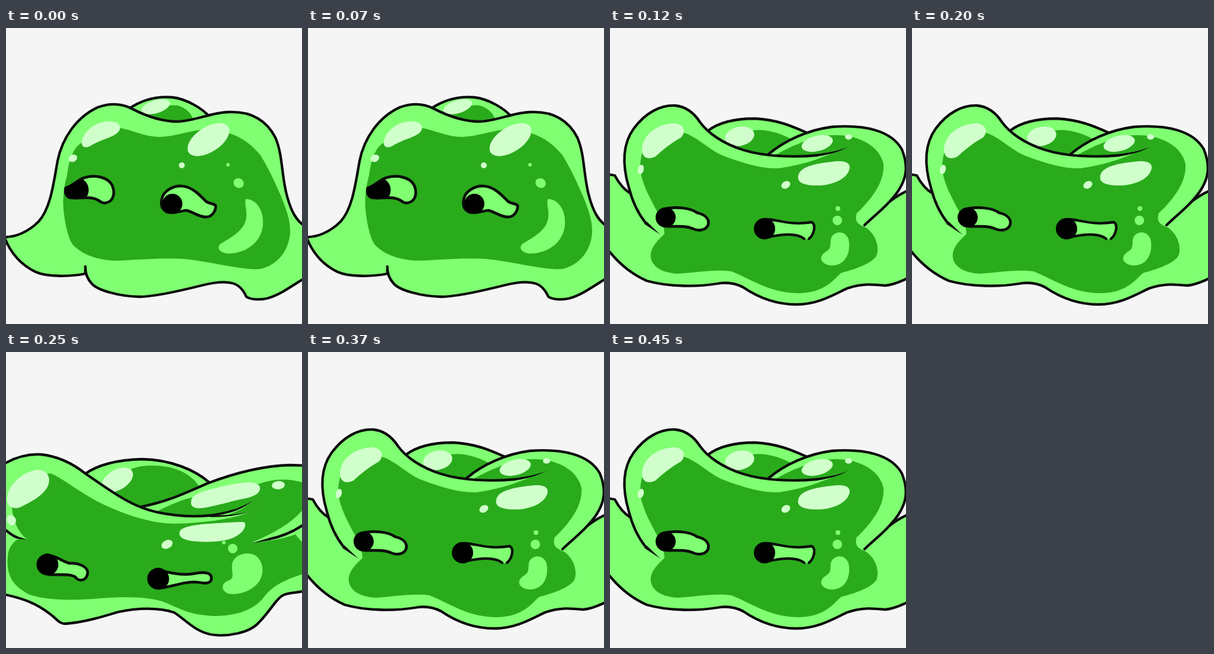
An HTML page for the animation above (500 ms loop, 500 by 500 pixels).

```html
<!DOCTYPE html>
<html lang="en">
<head>
<meta charset="utf-8">
<title>Wobbling slime</title>
<style>
  html, body { margin: 0; width: 100%; height: 100%; overflow: hidden; background: #f5f5f5; }
  svg { display: block; width: 100%; height: 100%; }
  .pose { visibility: hidden; }
  .body, .line, .eye { stroke: #0b0d0b; stroke-width: 4.3; stroke-linecap: round; stroke-linejoin: round; }
  .eye { stroke-width: 4.7; }
  .body, .eye, .light { fill: #80ff72; }
  .line { fill: none; }
  .dark { fill: #2aab1c; }
  .shine { fill: #d0ffcb; }
  .ink { fill: #0b0d0b; }
  .pupil { fill: #000; }
</style>
</head>
<body>
<svg viewBox="0 0 500 500">
  <g class="pose" id="tall">
    <path class="body" d="M208 136C232 120 256 115 280 117C308 120 333 138 343 149L300 175H230Z"/>
    <path class="dark" d="M226 145L250 141C262 132 278 129 290 131C305 135 315 146 316 156L280 160Z"/>
    <ellipse class="shine" cx="253" cy="133" rx="25" ry="11" transform="rotate(-17 253 133)"/>
    <path class="body" d="M-5 353C15 354 37 345 55 327C75 305 80 265 87 225C95 185 120 150 155 134C180 125 200 130 212 136C235 148 262 158 290 158C320 157 345 143 375 142C415 140 440 156 455 185C468 215 465 250 475 285C482 310 490 325 505 335V422C480 438 460 452 440 457C425 460 412 458 406 454C402 445 395 434 382 431C370 428 350 430 330 435C290 445 250 454 225 454C190 453 155 443 145 432C137 423 134 415 134 403L134 415C110 420 70 421 50 412C25 400 8 380 -2 355Z"/>
    <path class="dark" d="M103 250C106 225 112 208 122 198L160 172L193 169C215 173 235 184 260 184C285 183 305 175 330 172L378 178C400 185 418 200 430 215C445 240 455 262 465 285C475 310 480 325 480 345C478 375 460 400 430 407C400 410 350 395 300 390C250 388 220 392 185 393C150 392 125 380 112 365C100 345 95 300 97 285C98 270 100 260 103 250Z"/>
    <path class="shine" d="M128 194C128 180 145 160 170 158C188 156 195 164 192 172C187 184 162 187 143 199C134 204 128 201 128 194Z"/>
    <ellipse class="shine" cx="113" cy="220" rx="7.5" ry="6" transform="rotate(-25 113 220)"/>
    <ellipse class="shine" cx="342" cy="188.500" rx="40" ry="21" transform="rotate(-33 342 188.500)"/>
    <circle class="shine" cx="297" cy="232" r="5"/>
    <circle class="light" cx="375" cy="231" r="3"/>
    <ellipse class="light" cx="393" cy="262" rx="9" ry="8" transform="rotate(30 393 262)"/>
    <path class="light" d="M405 289C422 288 436 308 434 332C432 362 405 381 375 381C360 380 355 370 363 364C375 357 398 345 404 328C410 312 402 300 405 289Z"/>
    <path class="eye" d="M101 270C112 268 118 258 132 253C150 247 172 252 179 265C185 278 182 292 170 295C160 298 158 289 148 288C135 284 118 290 106 286C100 282 99 275 101 270Z"/>
    <path class="pupil" d="M100 270C112 264 120 260 130 256C140 262 142 275 137 284C125 289 105 289 102 282Z"/>
    <path class="eye" d="M263 290C265 275 283 266 297 267C315 268 328 283 338 293C345 298 352 296 354 300C355 306 350 318 340 319C330 321 318 312 305 308C295 309 285 314 272 311C264 307 261 300 263 290Z"/>
    <circle class="pupil" cx="281" cy="297" r="17"/>
  </g>

  <g class="pose" id="sagging">
    <path class="body" d="M165 174C185 158 215 153 245 153C285 155 310 167 335 178L270 230H200Z"/>
    <path class="dark" d="M242 173C262 170 288 177 310 190L268 216C240 212 215 205 196 196Z"/>
    <ellipse class="shine" cx="219" cy="183" rx="25" ry="16" transform="rotate(-12 219 183)"/>
    <path class="body" d="M-10 246L8 249C15 262 24 273 34 279L100 200L400 250L470 295C480 287 493 278 510 272V420C495 425 485 433 465 435C445 433 425 431 400 440C375 452 350 467 315 467C280 467 250 455 225 438C210 430 195 429 180 432C150 437 100 438 62 427C32 414 10 394 -10 366Z"/>
    <path class="light" d="M268 213C295 190 335 172 375 167C430 163 475 173 493 205C505 235 500 255 487 275C470 300 445 318 430 333Z"/>
    <path class="dark" d="M280 214C300 203 330 188 365 182C410 176 455 195 462 230C464 262 440 290 418 312L300 300Z"/>
    <path class="line" d="M268 213C295 190 335 172 375 167C430 163 475 173 493 205C505 235 500 255 487 275C470 300 445 318 430 333"/>
    <path class="light" d="M85 349C60 330 40 300 32 270C20 230 22 195 40 170C60 143 85 130 110 131C130 133 143 145 152 159C165 177 190 195 225 206C260 217 310 219 350 215C375 212 390 206 403 200C370 215 330 230 285 240Z"/>
    <path class="dark" d="M285 237C330 230 370 218 403 201L440 250L417 312C412 328 420 332 432 337C452 350 455 375 450 385C440 400 410 408 390 414C380 422 365 447 320 448C270 448 240 425 205 411C175 407 140 414 115 415C85 414 66 400 69 380C72 365 85 355 92 348C92 318 58 285 51 240C50 215 60 180 90 168L125 177C148 184 170 208 192 216C228 230 260 238 285 237Z"/>
    <path class="line" d="M60 329C45 310 37 290 32 270C20 230 22 195 40 170C60 143 85 130 110 131C130 133 143 145 152 159C165 177 190 195 225 206C260 217 310 219 350 215"/>
    <path class="ink" d="M62 327L85 349L58 331ZM349 213C375 210 390 206 403 200C390 208 375 213 350 217Z"/>
    <path class="shine" d="M54 205C55 180 80 162 108 161C126 162 129 176 120 185C105 193 90 205 77 217C65 223 54 220 54 205Z"/>
    <ellipse class="shine" cx="52" cy="239" rx="5" ry="8" transform="rotate(15 52 239)"/>
    <ellipse class="shine" cx="350" cy="195" rx="27" ry="13" transform="rotate(-14 350 195)"/>
    <ellipse class="shine" cx="403" cy="184" rx="6" ry="4.500"/>
    <path class="shine" d="M318 250C320 235 345 229 375 226C400 222 408 230 404 240C398 258 370 267 345 266C325 265 316 260 318 250Z"/>
    <ellipse class="shine" cx="297" cy="265" rx="8" ry="6" transform="rotate(-30 297 265)"/>
    <circle class="light" cx="385" cy="305" r="4"/>
    <circle class="light" cx="384" cy="325" r="8"/>
    <path class="light" d="M375 352C382 342 398 343 403 357C406 372 403 386 393 395C380 405 362 402 357 392C355 380 368 378 371 372C374 365 371 358 375 352Z"/>
    <path class="eye" d="M94 305C110 302 135 303 147 312C160 315 168 322 166 332C162 343 148 343 140 339C125 333 110 336 95 335"/>
    <circle class="pupil" cx="94" cy="320" r="17"/>
    <path class="light" d="M262 323C285 323 300 334 341 328L346 343L334 357L328 356C315 346 290 348 265 354Z"/>
    <path class="line" d="M262 323C285 323 300 334 341 328C349 333 344 350 336 356M328 356C315 346 290 348 265 354"/>
    <circle class="pupil" cx="261" cy="339" r="18"/>
  </g>

  <g class="pose" id="flat">
    <path class="body" d="M132 207C155 190 190 182 230 181C280 182 320 200 343 220L230 290Z"/>
    <path class="dark" d="M178 236L213 197C235 189 270 190 295 201C312 209 322 219 326 228L225 264Z"/>
    <ellipse class="shine" cx="188" cy="216" rx="29" ry="17" transform="rotate(-30 188 216)"/>
    <path class="body" d="M225 262C265 255 300 240 340 222C390 203 440 192 480 191L510 192V402C495 407 480 406 470 410C458 414 446 438 427 457C412 474 375 482 345 477C318 471 303 452 284 440C255 431 225 432 190 439C160 448 130 457 100 459C90 459 87 452 75 443C52 425 30 416 -10 408V290Z"/>
    <path class="dark" d="M255 269C285 255 300 248 320 245L430 222C460 212 485 215 505 222V262C485 288 455 305 415 322L300 330Z"/>
    <path class="light" d="M-5 190C15 178 35 172 58 173C90 176 115 190 135 206C170 230 200 252 230 263C260 275 310 280 345 276C380 271 400 262 418 250L410 285L285 295L20 330L-5 320Z"/>
    <path class="dark" d="M75 205C93 211 130 242 170 260C210 278 250 290 285 290C330 289 380 283 410 271L368 277C388 271 405 263 418 250L440 280L415 322C445 320 470 315 489 308C493 313 497 319 505 324V374C470 385 450 395 435 415C415 440 380 446 350 446C315 444 300 437 280 428C255 414 215 412 160 416C120 420 70 420 40 410C10 395 0 375 3 345C4 330 12 320 24 314L36 317C22 306 12 288 10 262L40 210Z"/>
    <path class="line" d="M-5 190C15 178 35 172 58 173C90 176 115 190 135 206C170 230 200 252 230 263C260 275 310 280 345 276M505 290C485 304 465 312 445 316M-5 297C4 305 10 310 18 313"/>
    <path class="ink" d="M345 274C380 269 400 262 418 250C400 266 380 273 345 278ZM345 276C370 276 390 274 410 271C390 276 370 279 345 279ZM445 314L415 323L446 318ZM18 311L36 317L17 315Z"/>
    <path class="shine" d="M2 245C5 222 30 202 52 199C72 199 77 215 70 228C62 243 40 255 22 263C8 266 0 258 2 245Z"/>
    <ellipse class="shine" cx="9" cy="284" rx="7.500" ry="9" transform="rotate(-25 9 284)"/>
    <path class="shine" d="M313 250C315 240 335 234 370 226C400 220 425 217 429 228C431 240 415 246 395 249C370 255 340 264 325 264C314 263 311 258 313 250Z"/>
    <ellipse class="shine" cx="460" cy="225" rx="11" ry="7" transform="rotate(-5 460 225)"/>
    <path class="shine" d="M293 305C295 292 330 290 400 287C408 288 404 300 395 307C380 320 350 322 320 320C302 318 292 314 293 305Z"/>
    <ellipse class="shine" cx="272" cy="325" rx="10" ry="7" transform="rotate(-25 272 325)"/>
    <circle class="light" cx="368" cy="322" r="3"/>
    <circle class="light" cx="383" cy="332" r="8"/>
    <path class="light" d="M382 358C385 343 405 336 420 343C435 352 437 372 428 387C418 402 395 412 375 408C362 402 364 390 376 386C388 382 380 370 382 358Z"/>
    <path class="eye" d="M75 344C88 346 95 354 108 357C122 356 138 362 138 373C136 388 122 388 117 380C108 374 92 377 72 376"/>
    <circle class="pupil" cx="70" cy="359" r="18.500"/>
    <path class="eye" d="M258 368C275 373 300 378 320 374C340 370 348 375 347 383C346 392 335 391 325 389C300 387 285 396 260 399"/>
    <circle class="pupil" cx="257" cy="383" r="18.500"/>
  </g>
</svg>
<script>
  const LOOP = 500;
  const poses = [...document.querySelectorAll('.pose')];
  const start = performance.now();

  function poseAt(time) {
    if (time < 120) return 'tall';
    return time >= 250 && time < 370 ? 'flat' : 'sagging';
  }

  function draw() {
    const current = poseAt((performance.now() - start) % LOOP);
    for (const pose of poses) {
      pose.style.visibility = pose.id === current ? 'visible' : 'hidden';
    }
    requestAnimationFrame(draw);
  }
  draw();
</script>
</body>
</html>
```
